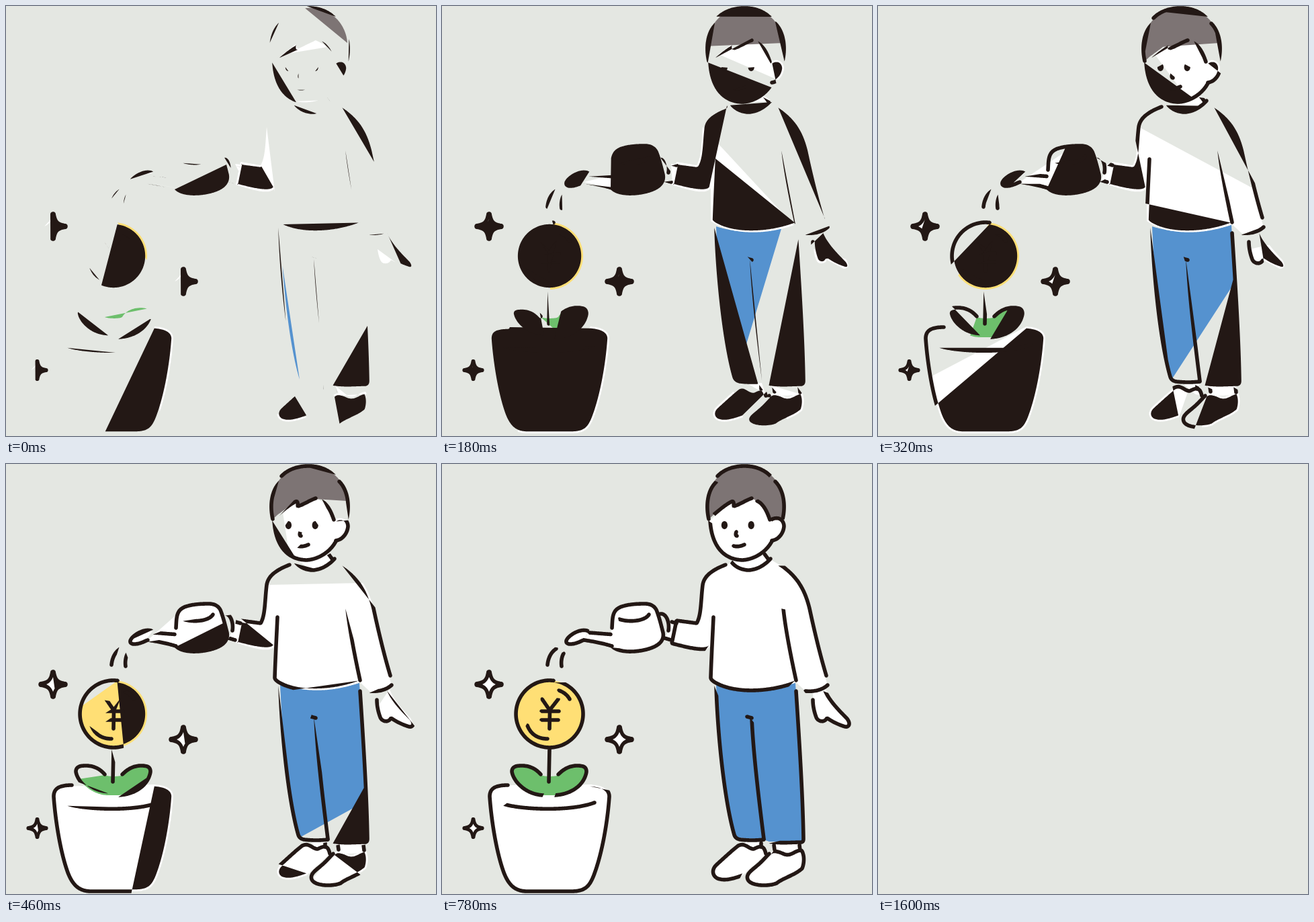
An HTML page with a canvas for the animation above (1.62 s loop, 640 by 640 pixels).

```html
<!DOCTYPE html>
<html lang="en">
<head>
<meta charset="utf-8">
<title>Growing savings</title>
<style>
html, body { margin: 0; width: 100%; height: 100%; overflow: hidden; background: #e4e7e2; }
canvas { display: block; width: 640px; height: 640px; }
</style>
</head>
<body>
<canvas id="stage" width="640" height="640"></canvas>
<script>
const ctx = document.getElementById('stage').getContext('2d');
const LOOP = 1620, STEP = 20, DRAW_END = 1100, BLANK_AT = 1600;
const PAPER = '#e4e7e2', INK = '#231815', WHITE = '#ffffff', BLUE = '#5592cf',
  GREEN = '#6dbf6c', YELLOW = '#ffdf75', GRAY = '#7d7474';
const LINE = 5.6;

// Evenly spaced points along an SVG path
function sample(d, gap = 1.2) {
  const path = document.createElementNS('http://www.w3.org/2000/svg', 'path');
  path.setAttribute('d', d);
  const total = path.getTotalLength(), count = Math.max(4, Math.ceil(total / gap));
  return Array.from({ length: count + 1 }, (_, i) => {
    const { x, y } = path.getPointAtLength(total * i / count);
    return [x, y];
  });
}

// Outline of a round-capped line: along one side, around the tip, back along the other.
// side 1 starts on the right of the travel direction, -1 on the left.
function outline(d, side = 1, width = LINE) {
  const pts = sample(d), last = pts.length - 1, r = width / 2;
  const angles = pts.map((_, i) => {
    const a = pts[Math.max(0, i - 1)], b = pts[Math.min(last, i + 1)];
    return Math.atan2(b[1] - a[1], b[0] - a[0]);
  });
  const at = (i, turn) => [pts[i][0] + r * Math.cos(angles[i] + turn), pts[i][1] + r * Math.sin(angles[i] + turn)];
  const q = side * Math.PI / 2;
  const cap = (i, from) => Array.from({ length: 7 }, (_, k) => at(i, from - q * (k + 1) / 4));
  const there = pts.map((_, i) => at(i, q));
  const back = pts.map((_, i) => at(i, -q)).reverse();
  return [...there, ...cap(last, q), ...back, ...cap(0, -q)];
}

function measure(pts) {
  const lengths = [0];
  for (let i = 1; i < pts.length; i++)
    lengths.push(lengths[i - 1] + Math.hypot(pts[i][0] - pts[i - 1][0], pts[i][1] - pts[i - 1][1]));
  return { pts, lengths };
}

// Adds the first part of a contour; filling closes it with a chord
function trace({ pts, lengths }, part) {
  if (part <= 0) return;
  const end = lengths[lengths.length - 1] * Math.min(1, part);
  ctx.moveTo(...pts[0]);
  for (let i = 1; i < pts.length; i++) {
    if (lengths[i] > end) {
      const k = (end - lengths[i - 1]) / (lengths[i] - lengths[i - 1]);
      ctx.lineTo(pts[i - 1][0] + (pts[i][0] - pts[i - 1][0]) * k, pts[i - 1][1] + (pts[i][1] - pts[i - 1][1]) * k);
      break;
    }
    ctx.lineTo(...pts[i]);
  }
  ctx.closePath();
}

const shapes = [];
const area = (color, d) => shapes.push({ color, contour: measure(sample(d)) });
const line = (d, side, width) => shapes.push({ color: INK, contour: measure(outline(d, side, width)) });

function star(x, y, scale, holeScale) {
  const place = (d, s) => measure(sample(d, 0.8).map(([px, py]) => [x + px * s, y + py * s]));
  const hole = 'M0,-11 Q-3,-3 -10,0 Q-3,3 0,11 Q3,3 10,0 Q3,-3 0,-11';
  shapes.push({ color: WHITE, contour: place(hole, scale * 1.3) });
  shapes.push({
    color: INK,
    contour: place('M-4,-18 C-4,-23 4,-23 4,-18 C6,-8 8,-6 18,-4 C23,-4 23,4 18,4 C8,6 6,8 4,18 ' +
      'C4,23 -4,23 -4,18 C-6,8 -8,6 -18,4 C-23,4 -23,-4 -18,-4 C-8,-6 -6,-8 -4,-18', scale),
    hole: place(hole, holeScale)
  });
}

// Colour areas
area(WHITE, 'M221,477 C238,478 249,484 249,495 C247,525 240,575 226,612 C219,630 212,636 192,636 L127,636 C108,636 99,626 92,608 C80,575 73,525 71,495 C71,483 79,478 98,478 Z');
area(GREEN, 'M147,463 C150,465 168,466 173,463 C180,450 200,446 214,452 C217,462 203,492 167,493 L152,493 C130,493 107,475 104,455 C108,447 133,445 147,463');
area(YELLOW, 'M166,322.4 A49,49 0 1 1 154,421.6 A49,49 0 0 1 166,322.4');
area(WHITE, 'M211,262 L253,271 C262,281 288,281 308,275 C324,270 331,262 329,251 L319,217 Q314,208 302,208 C288,208 278,209 268,212 C252,217 253,228 252,251 L219,250 Z');
area(WHITE, 'M218,249 C213,246 203,247 193,254 C182,262 183,268 191,268 C199,268 206,264 211,262 Z');
area(WHITE, 'M341,235 L349,236 L343,264 L331,259 L338,248 Z');
area(WHITE, 'M453,561 L476,561 L482,580 Q465,577 450,567 Z');
area(WHITE, 'M490,565 L495,577 Q510,583 533,577 L532,564 Z');
area(WHITE, 'M448,612 C434,617 424,620 414,618 C403,616 400,605 408,597 C420,586 432,575 441,568 C451,563 456,573 464,573 C474,568 479,567 483,580 Z');
area(WHITE, 'M487,580 C493,573 503,578 510,581 C520,584 525,575 535,574 C540,582 539,595 536,602 C525,612 508,616 498,624 C485,629 462,628 456,620 C450,611 462,604 470,597 Z');
area(BLUE, 'M437,556 C420,500 411,400 408,328 Q460,345 526,326 C531,400 536,490 538,562 L487,562 L479,559 Z');
area(WHITE, 'M553,362 Q556,383 563,383 Q570,384 573,378 L598,391 Q609,390 602,378 C588,363 576,350 571,335 L552,339 Z');
area(WHITE, 'M432,142 C445,145 465,143 480,134 L489,141 C475,156 462,158 455,158 C443,157 436,152 432,146 Z');
area(WHITE, 'M388,180 C386,205 386,225 379,237 L349,232 L342,266 C362,272 392,283 400,271 L400,320 C430,342 485,341 527,325 L541,338 Q560,340 574,329 C560,285 554,240 547,215 C540,187 529,167 502,150 L489,142 C475,160 441,162 431,147 L422,150 C399,159 390,168 388,180');
area(WHITE, 'M412,72 L431,57 L434,64 L461,51 L469,55 C480,60 485,75 488,83 C500,77 509,83 509,93 C508,104 500,113 491,114 C483,130 466,142 447,143 C416,142 401,118 399,84 Z');
area(GRAY, 'M508,55 C507,35 492,3 450,3 C412,4 396,32 395,60 L397,82 L405,75 L431,56 L434,64 L461,51 L469,55 C480,60 485,75 488,83 Q498,78 507,81 Z');

// Plant, pot and coin
line('M221,477 C238,478 249,484 249,495 C247,525 240,575 226,612 C219,630 212,636 192,636 L127,636 C108,636 99,626 92,608 C80,575 73,525 71,495 C71,483 79,478 98,478');
line('M92,506 C115,514 190,518 227,504');
line('M152,493 C128,493 107,475 104,458 C104,450 111,449 119,449 C132,449 141,455 147,462');
line('M167,493 C192,492 212,478 215,458 C215,450 209,449 201,449 C189,449 180,455 173,462');
line('M160,425 L159,473');
line('M166,322.4 A49,49 0 1 1 154,421.6 A49,49 0 0 1 166,322.4');
line('M149,350 L160,366');
line('M173,350 L160.5,366 L160,394');
line('M148,368 L174,368');
line('M148,381 L173,381');
line('M174,337 Q185,341 190,350');
line('M127,389 C132,402 142,409 157,409');

// Watering can and drops
line('M253,271 C262,281 288,281 308,275 C324,270 331,262 329,251 C326,239 323,227 319,217 Q314,208 302,208 C288,208 278,209 268,212 C253,217 254,228 253,244');
line('M218,249 C213,246 203,247 193,254 C182,262 183,268 191,268 C199,268 206,264 211,262');
line('M211,262 C225,264 240,267 253,271');
line('M219,251 L251,253.5');
line('M264,231 C278,236 302,234 308,224');
line('M325,223 C334,222 339,236 337,248');
line('M342,235 L349,237');
line('M331,259 L341,262');
line('M170,275 C162,280 158,289 157,299');
line('M181,282 C178,287 177,295 178,301');

// Head
line('M489,18 C479,8 466,3 450,3 C434,3 420,8 410,18');
line('M408,27 C396,38 392,60 397,82');
line('M507,82 C512,60 508,38 496,26');
line('M405,75 C411,70 421,61 431,56 Q435,54 434,63 C444,60 452,54 461,51');
line('M469,55 C480,60 485,75 488,83', -1);
line('M490,83 C500,77 509,83 509,93 C508,104 500,113 491,114');
line('M399,84 C401,118 416,142 447,143 C466,142 483,130 491,115');
line('M431,146 C437,154 447,158 457,158 C470,157 481,150 489,141');
line('M480,134 L486,142');
area(INK, 'M415.8,91 A4.6,6 0 1 0 425,91 A4.6,6 0 1 0 415.8,91');
area(INK, 'M464.8,91 A4.6,6 0 1 1 455.6,91 A4.6,6 0 1 1 464.8,91');
line('M438,101 Q436,107 439,107');
line('M434,122 Q442,124 450,120');

// Sweater and hand
line('M400,271 C394,281 362,272 342,267 L349,233 L379,237 C386,225 385,205 388,180 C390,168 399,159 422,150');
line('M526,325 C490,339 440,342 410,327 Q400,322 400,318 C401,288 403,250 404,228');
line('M502,149 C529,167 540,187 547,215 C555,252 563,285 572,315');
line('M508,215 C511,245 520,290 527,322');
line('M541,338 C553,339 565,337 574,329');
line('M570,337 C576,352 592,368 602,378 C609,386 606,392 600,391 C590,388 580,383 573,378 C569,386 559,383 557,377 C554,369 552,360 552,351');

// Trousers and shoes
line('M408,330 C410,400 420,500 435,552 Q437,558 444,559 Q462,561 479,559');
line('M461,377 C463,430 473,510 479,558');
line('M454,376 L461,378', -1);
line('M487,562 C503,565 520,563 534,563 Q538,563 538,558 C537,490 531,400 527,338');
line('M475,564 L475,570');
line('M494,567 L495,574');
line('M532,567 L533,575');
line('M448,612 C434,617 424,620 414,618 C403,616 400,605 408,597 C420,586 432,575 441,568 C451,563 456,573 464,573 C474,568 479,567 482,580');
line('M487,580 C493,573 503,578 510,581 C520,584 525,575 535,575 C540,582 539,595 536,602 C525,612 508,616 498,624 C485,629 462,628 456,620 C450,611 462,604 470,597 C477,591 482,585 487,580');

star(70, 328, 1, 1);
star(264, 410, 1, 1);
star(46.5, 542, 0.74, 0.6);

// Share of the drawing time spent on a star's rim before its hole
const RIM_SHARE = 0.43;

function render(time) {
  ctx.fillStyle = PAPER;
  ctx.fillRect(0, 0, 640, 640);
  const t = Math.floor(time / STEP) * STEP;
  if (t >= BLANK_AT) return;
  const s = Math.min(1, t / DRAW_END);
  const part = 1 - 0.75 * (1 - s) ** 2 * (1 - s ** 3);
  for (const { color, contour, hole } of shapes) {
    ctx.fillStyle = color;
    ctx.beginPath();
    trace(contour, hole ? part / RIM_SHARE : part);
    if (hole) trace(hole, (part - RIM_SHARE) / (1 - RIM_SHARE));
    ctx.fill(hole ? 'evenodd' : 'nonzero');
  }
}

const start = performance.now();
function tick() {
  render((performance.now() - start) % LOOP);
  requestAnimationFrame(tick);
}
tick();
</script>
</body>
</html>
```
